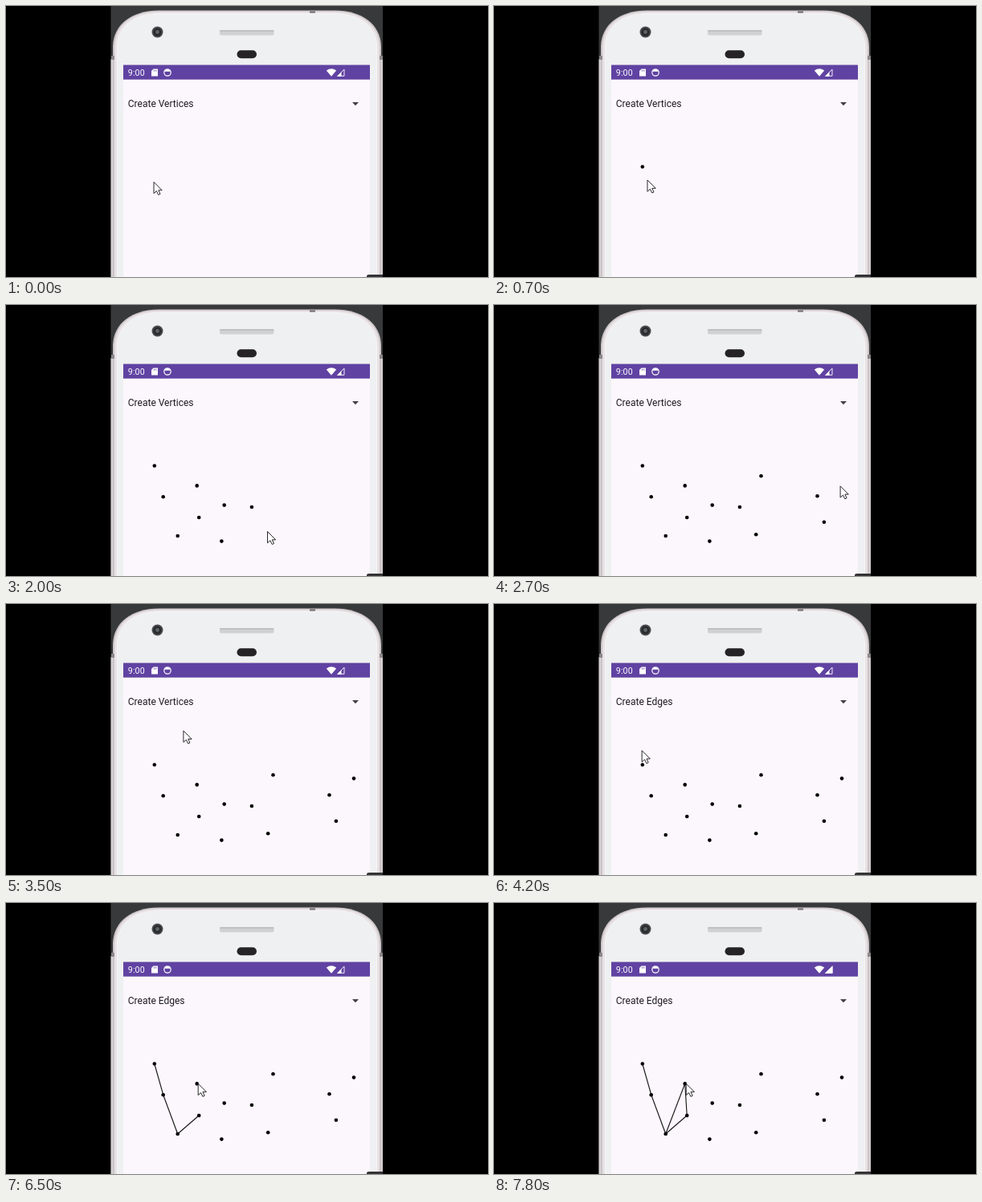
Recreate the animation shown at these times as an HTML page. Size 600 by 338 pixels, loop 8 s.

```html
<!DOCTYPE html>
<html lang="en">
<head>
<meta charset="utf-8">
<title>Graph editor on a phone</title>
<style>
html, body { margin: 0; width: 100%; height: 100%; overflow: hidden; background: #000; }
svg { display: block; width: 100vw; height: 100vh; }
text { font-family: Roboto, sans-serif; }
</style>
</head>
<body>
<svg viewBox="0 0 600 338">
  <rect width="600" height="338"/>
  <!-- phone -->
  <rect x="130.500" width="338.500" height="338" fill="#38393a"/>
  <rect x="130.500" y="66" width="338.500" height="272" fill="#d6d0d2"/>
  <path d="M133 338V50C134 23 156 5.500 191 5.500H409C444 5.500 466 23 467 50V338z" fill="#cbc5c7"/>
  <path d="M135 338V50C136 24 157 7 191 7H409C443 7 464 24 465 50V338z" fill="#e9e2e4"/>
  <path d="M138.500 338V50C139.500 26 159 9.500 192 9.500H408C441 9.500 460.500 26 461.500 50V338z" fill="#eff0f1" stroke="#f6f6f7"/>
  <path d="M378 5h7v4h-7zM131 62h4v5h-4zM465 62h4v5h-4z" fill="#8b8789"/>
  <circle cx="188.500" cy="32.500" r="7" fill="#4c4e50"/>
  <circle cx="188.500" cy="32.500" r="5.200" fill="#292b2d"/>
  <circle cx="188.500" cy="32.500" r="2.400" fill="#5d6467"/>
  <rect x="266" y="30" width="67.500" height="6.500" rx="2" fill="#d0d1d2"/>
  <rect x="266" y="30" width="67.500" height="2" rx="1" fill="#bfc0c1"/>
  <rect x="287.500" y="55.300" width="24.500" height="10" rx="5" fill="#252325"/>
  <rect x="146" y="73.500" width="307" height="264.500" fill="#fcf7fc"/>
  <rect x="146" y="73.500" width="307" height="18.200" fill="#6042a2"/>
  <path d="M449 338v-1q0-2 3-2h17v3z" fill="#343235"/>

  <!-- status bar -->
  <g fill="#fff">
    <text x="151.800" y="86.700" font-size="10.600" letter-spacing=".15">9:00</text>
    <path d="M183.500 78.500H189V87.500H181V81z"/>
    <path d="M184 79.800v1.700M185.600 79.800v1.700M187.200 79.800v1.700" stroke="#6042a2" stroke-width=".7"/>
    <circle cx="201" cy="83" r="4.200" fill="none" stroke="#fff" stroke-width="1.200"/>
    <path d="M197.200 81.800a4 4 0 0 1 7.600 0z"/>
    <path d="M398.800 80.500Q405 75.800 411.200 80.500L405 87.800z"/>
    <path d="M412.700 87.300H421V79z" fill="none" stroke="#fff" stroke-width=".9"/>
    <path d="M412 87.800L417.500 82.300V87.800z"/>
    <path id="signal" d="M412 87.800H421.500V78.200z"/>
  </g>
  <text id="mode" x="151.800" y="126.100" font-size="12" fill="#1d1b20"></text>
  <path d="M431 120H439L435 124.200z" fill="#424045"/>
  <g id="edges" stroke="#151515" stroke-width="1.150"></g>
  <g id="dots"></g>
  <path id="cursor" d="M0 0V14.300L3.400 11.200L5.700 16L8 15L5.800 10.300H10.200z"
    fill="#fff" stroke="#29272b" stroke-linejoin="round"/>
</svg>
<script>
const LOOP = 8000, STEP = 100;
const MODE_CHANGE = 3900;
const $ = id => document.getElementById(id);

const vertices = [
  [184.8, 200.5], [195.7, 239.2], [213.7, 288], [237.7, 225.4], [240.2, 265],
  [268.4, 294.6], [271.7, 249.6], [305.9, 252], [326.2, 286.2], [332.5, 213.3],
  [402.5, 238.3], [410.9, 270.8], [433, 217.6]
];
const edges = [[0, 1], [1, 2], [2, 4], [4, 3], [2, 3]];

const timed = [];
const stops = [{ x: 184, y: 219.5, arrive: 0, leave: 300 }];
const stop = (x, y, arrive, leave) => stops.push({ x, y, arrive, leave });

function add(parent, tag, attrs, start) {
  const el = document.createElementNS("http://www.w3.org/2000/svg", tag);
  for (const key in attrs) el.setAttribute(key, attrs[key]);
  timed.push([parent.appendChild(el), start]);
}

// Vertices are tapped at a steady pace.
vertices.forEach(([cx, cy], i) => {
  const tap = 620 + 177 * i;
  add($("dots"), "circle", { cx, cy, r: 2.3 }, tap);
  stop(cx + 1.5, cy, tap, tap);
});

// Open the menu, pick the other mode.
stop(431, 121, 3100, 3200);
stop(182, 165, 3600, MODE_CHANGE);

// Each edge joins two taps; its start is skipped if the pointer is there already.
let tap = 4200, last = -1;
function visit(v) {
  if (v === last) return;
  tap += 500;
  last = v;
  stop(vertices[v][0] + 1.5, vertices[v][1], tap - 200, tap);
}
for (const [a, b] of edges) {
  visit(a);
  visit(b);
  const [x1, y1] = vertices[a], [x2, y2] = vertices[b];
  add($("edges"), "line", { x1, y1, x2, y2 }, tap);
}

const show = (el, on) => el.setAttribute("visibility", on ? "visible" : "hidden");
const ease = u => u * u * (3 - 2 * u);

function pointer(t) {
  const i = stops.findLastIndex(s => s.arrive <= t);
  const a = stops[i], b = stops[i + 1] || a;
  const k = t > a.leave && b !== a ? ease((t - a.leave) / (b.arrive - a.leave)) : 0;
  return [a.x + (b.x - a.x) * k, a.y + (b.y - a.y) * k];
}

function draw(t) {
  for (const [el, start] of timed) show(el, t >= start);
  show($("signal"), (t >= 4500 && t < 4900) || t >= 7200);
  $("mode").textContent = t < MODE_CHANGE ? "Create Vertices" : "Create Edges";
  $("cursor").setAttribute("transform", `translate(${pointer(t)})`);
}

const origin = performance.now();
function tick() {
  const t = (performance.now() - origin) % LOOP;
  draw(Math.floor(t / STEP) * STEP);
  requestAnimationFrame(tick);
}
tick();
</script>
</body>
</html>
```
